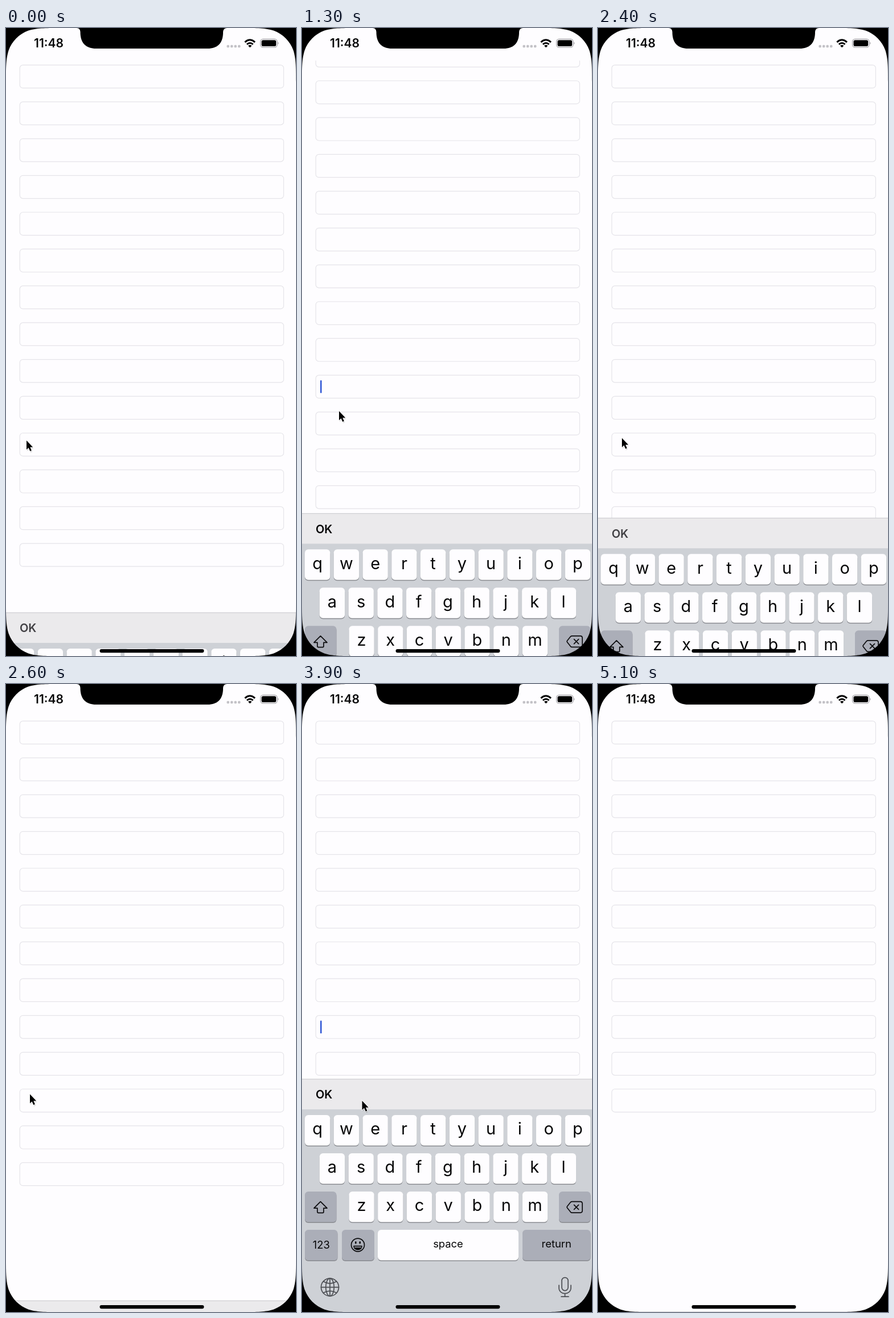
An HTML page that plays this animation: 509x1100 px, repeating every 6.3 s.

```html
<!DOCTYPE html>
<html lang="en">
<head>
<meta charset="utf-8">
<title>Form fields and keyboard</title>
<style>
  html, body { margin: 0; width: 100%; height: 100%; overflow: hidden; background: #000; }
  svg { display: block; width: 100vw; height: 100vh; }
  text { font-family: Inter, Roboto, sans-serif; fill: #060607; text-anchor: middle; }
  .field { fill: #fefdff; stroke: #e5e4e9; stroke-width: 1.2; }
  .key { fill: #fefdff; }
  .key.dark { fill: #abaeb8; }
  .lip { fill: #898b90; }
  .letter { font-size: 29px; }
  .label { font-size: 18.4px; }
  .icon { fill: none; stroke: #0b0b0d; stroke-width: 1.7; stroke-linejoin: round; stroke-linecap: round; }
  .soft { stroke: #4c4e53; }
  #ok { font-size: 20px; font-weight: 600; text-anchor: start; }
  .clock { font-size: 21px; font-weight: 600; }
</style>
</head>
<body>
<svg viewBox="0 0 509 1100">
  <defs>
    <clipPath id="list"><rect y="57" width="509" height="1043"/></clipPath>
    <path id="corner" d="M-2-2H94.8V0C67.5 0 53.8 0 39.2 4.6C23.1 10.5 10.5 23.1 4.6 39.2C0 53.8 0 67.5 0 94.8H-2Z"/>
  </defs>
  <rect width="509" height="1100" fill="#fefdff"/>

  <g clip-path="url(#list)">
    <g id="rows"><rect id="caret" x="32" width="2.6" height="22.6" rx="1.2" fill="#3359d6"/></g>
  </g>

  <g id="keyboard">
    <rect y="52" width="509" height="400" fill="#ced1d6"/>
    <rect width="509" height="53" fill="#ebeaec"/>
    <rect y="-.5" width="509" height="1.2" fill="#cecdd1"/>
    <text id="ok" x="24" y="34.3">OK</text>
    <g id="keys"></g>
    <g class="icon">
      <path d="M32.5 214.5L44 226H38V232.5Q38 234.3 36.2 234.3H28.8Q27 234.3 27 232.5V226H21Z"/>
      <path d="M474 214.5H488.5Q492 214.5 492 218V230.5Q492 234 488.5 234H474Q472.500 234 471.500 233L465.500 225.500Q464.500 224.200 465.500 223L471.500 215.500Q472.500 214.500 474 214.500ZM477.500 220.300L485.500 228.300M485.500 220.300L477.500 228.300"/>
      <circle cx="98" cy="290.500" r="11.500"/>
      <path d="M91 292.500H105C104.500 301 91.500 301 91 292.500Z" fill="#0b0b0d"/>
      <path d="M92.500 294.300H103.500" stroke="#abaeb8" stroke-width="1.500"/>
      <path d="M94.300 285.500V287.300M101.700 285.500V287.300" stroke-width="2.600"/>
    </g>
    <g class="icon soft">
      <circle cx="49" cy="364.500" r="15.500"/>
      <ellipse cx="49" cy="364.500" rx="7.300" ry="15.500"/>
      <path d="M33.500 364.500H64.500M49 349V380M37.500 354.500Q49 361.500 60.500 354.500M37.500 374.500Q49 367.500 60.500 374.500"/>
      <rect x="456" y="347.500" width="11" height="23" rx="5.500"/>
      <path d="M451 361V365.500C451 379 472 379 472 365.500V361M461.500 375.500V381M455 381H468"/>
    </g>
  </g>

  <g>
    <text class="clock" x="75" y="34.300">11:48</text>
    <g id="signal" fill="#c3c2c7"></g>
    <g fill="none" stroke="#060607" stroke-width="3">
      <path d="M419.300 24.800Q428 16.800 437 24.800"/>
      <path d="M422.800 28.600Q428.200 24 433.600 28.600"/>
    </g>
    <path d="M425 31Q428.200 28.700 431.400 31L428.200 34.300Z"/>
    <rect x="446.600" y="19.300" width="29.400" height="14.600" rx="4.600" fill="none" stroke="#a6a5aa" stroke-width="1.300"/>
    <rect x="448.500" y="21.200" width="25.600" height="10.800" rx="2.800"/>
    <path d="M477.400 24.200Q480 26.600 477.400 29Z" fill="#a6a5aa"/>
  </g>

  <path d="M124 0Q130 0 130.500 7V9C131 27 141 36 158 36H354C371 36 380.500 27 381 9V7Q381.500 0 388 0Z"/>
  <use href="#corner"/>
  <use href="#corner" transform="translate(509 0) scale(-1 1)"/>
  <use href="#corner" transform="translate(0 1100) scale(1 -1)"/>
  <use href="#corner" transform="translate(509 1100) scale(-1 -1)"/>
  <rect x="164.500" y="1088" width="183" height="6.200" rx="3.100"/>

  <g id="pointer">
    <path d="M1 2V18.500L4.500 15.200L7.200 21.200L10.300 19.800L7.700 14H12.500Z" fill="#000" opacity=".13"/>
    <path d="M0 0V16L3.600 12.700L6.300 18.700L8.900 17.600L6.300 11.800H11.200Z" stroke="#fff" stroke-width="1.600" paint-order="stroke"/>
  </g>
</svg>
<script>
const LOOP = 6300, STEP = 100, REST = 5100;
const ROW = 64.46, TOP = 64.9, OPEN = 691, HEIGHT = 409;
const $ = id => document.getElementById(id);

function add(parent, tag, attrs, text) {
  const el = document.createElementNS('http://www.w3.org/2000/svg', tag);
  for (const name in attrs) el.setAttribute(name, attrs[name]);
  if (text) el.textContent = text;
  parent.append(el);
  return el;
}

for (let i = 0; i < 14; i++) {
  const field = add($('rows'), 'rect', { class: 'field', x: 24.2, y: TOP + i * ROW, width: 463.2, height: 40.3, rx: 5.5 });
  $('rows').prepend(field);
}
for (let i = 0; i < 4; i++) {
  add($('signal'), 'rect', { x: 387.5 + i * 6.5, y: 29.8, width: 4.4, height: 4.4, rx: 1.5 });
}

function key(x, y, width, dark) {
  add($('keys'), 'rect', { class: 'lip', x, y: y + 1.4, width, height: 53.5, rx: 6 });
  add($('keys'), 'rect', { class: dark ? 'key dark' : 'key', x, y, width, height: 53.5, rx: 6 });
}

[['qwertyuiop', 5], ['asdfghjkl', 30.8], ['zxcvbnm', 82.4]].forEach(([letters, left], row) => {
  const y = 63 + row * 67;
  [...letters].forEach((letter, i) => {
    const x = left + i * 50.75;
    key(x, y, 44.3);
    add($('keys'), 'text', { class: 'letter', x: x + 22.1, y: y + 34.3 }, letter);
  });
});
key(5, 197, 55.5, true);
key(451, 197, 55.5, true);
[[5, 57.5, 1, '123', 297.3], [70, 57, 1], [133, 247, 0, 'space', 294.5], [387, 119.5, 1, 'return', 294.5]]
  .forEach(([x, width, dark, label, y]) => {
    key(x, 264, width, dark);
    if (label) add($('keys'), 'text', { class: 'label', x: x + width / 2, y }, label);
  });

// Critically damped spring from 0 to 1, time in ms.
function spring(ms, rate) {
  const x = Math.max(0, ms) / 1000 * rate;
  return 1 - Math.exp(-x) * (1 + x);
}

// Each entry: time, x, y of the pointer tip.
const path = [
  [0, 36, 722.5], [200, 36, 722.5], [700, 65, 690.5], [1000, 65, 671], [1400, 65, 671],
  [1800, 57, 693.5], [2100, 42, 718], [2600, 42, 718.5], [3100, 105.5, 730], [3900, 105.5, 730],
  [4100, 81, 728], [4400, 38, 716], [4600, 38, 714], [5000, -14, 549], [5100, -30, 549]
];

function pointerAt(t) {
  const i = Math.max(1, path.findIndex(p => p[0] >= t));
  const [t0, x0, y0] = path[i - 1], [t1, x1, y1] = path[i];
  const k = (t - t0) / (t1 - t0);
  return [x0 + (x1 - x0) * k, y0 + (y1 - y0) * k];
}

const visits = [
  { row: 9, open: 1178, close: 2317 },
  { row: 11, open: 3415, close: 4550 }
];

function draw(t) {
  const kb = ms => spring(t - ms, 16.9);
  let shown = 1 - kb(-183);
  for (const v of visits) shown += kb(v.open) - kb(v.close);
  $('keyboard').setAttribute('transform', `translate(0 ${OPEN + HEIGHT * (1 - shown)})`);

  const scroll = ROW * (spring(t - 1204, 20) + 2 * spring(t - 3422, 20));
  $('rows').setAttribute('transform', `translate(0 ${-scroll})`);

  const focus = visits.find(v => t >= v.open && t < v.close);
  $('ok').style.fill = focus ? '#060607' : '#414044';
  if (focus) {
    $('caret').setAttribute('y', TOP + focus.row * ROW + 8.8);
    $('caret').style.opacity = Math.min(1, Math.max(0, 1 - (t - focus.open - 700) / 280));
  } else {
    $('caret').style.opacity = 0;
  }

  const [x, y] = pointerAt(t);
  $('pointer').setAttribute('transform', `translate(${x} ${y})`);
}

const start = performance.now();
function tick() {
  const t = (performance.now() - start) % LOOP;
  draw(Math.min(REST, Math.floor(t / STEP) * STEP));
  requestAnimationFrame(tick);
}
tick();
</script>
</body>
</html>
```
